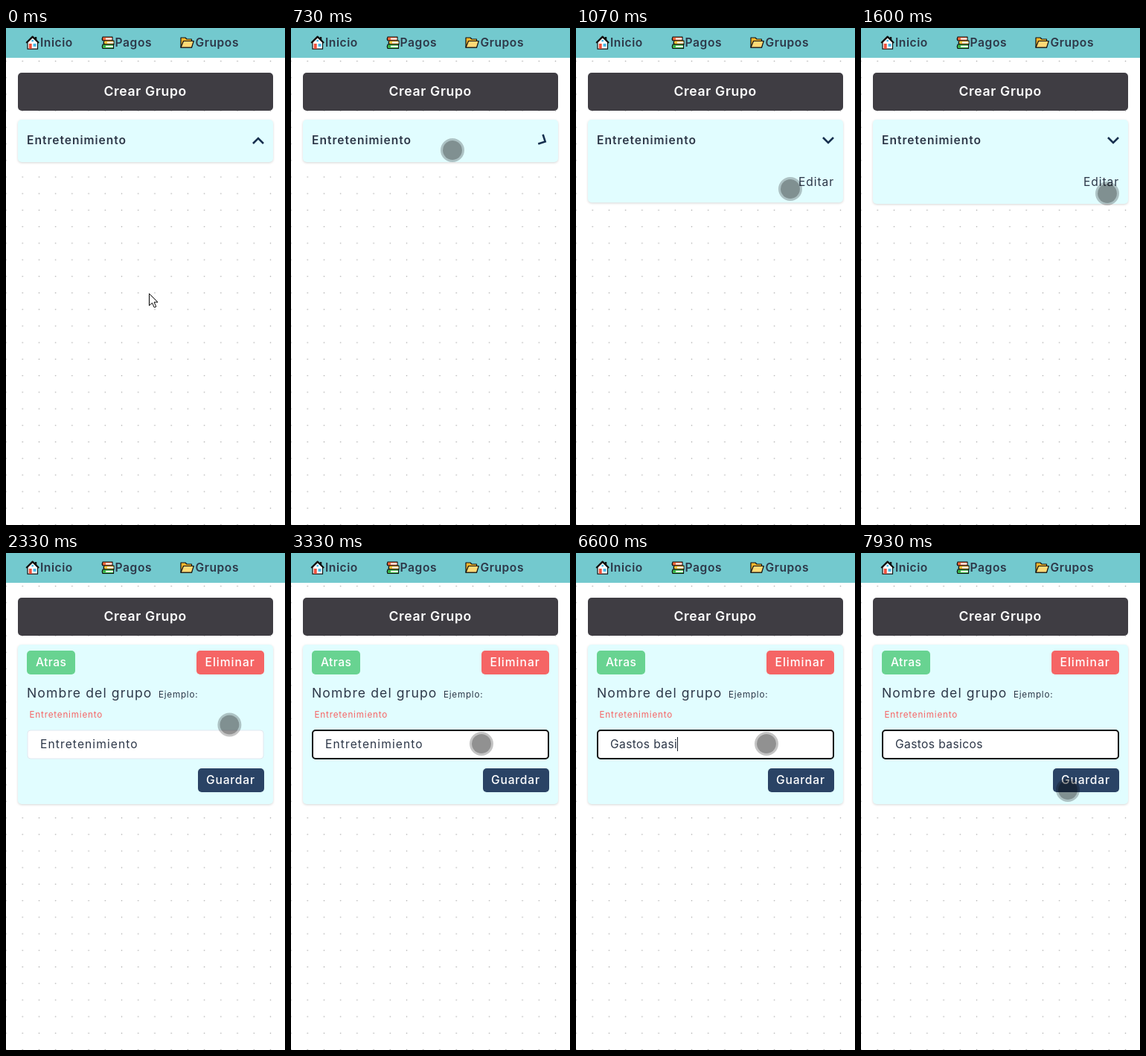
Recreate the animation shown at these times as an HTML page. Size 375 by 667 pixels, loop 8 s.

```html
<!DOCTYPE html>
<html lang="es">
<head>
<meta charset="utf-8">
<title>Grupos</title>
<style>
  html, body { margin: 0; width: 100%; height: 100%; overflow: hidden; background: #fff; }
  svg { display: block; }
  text { font: 400 15.6px Inter, "Open Sans", sans-serif; fill: #2d3748; white-space: pre; }
  .semi { font-weight: 600; }
  .medium { font-weight: 500; fill: #fff; }
  .small { font-size: 11.7px; }
  #panel { filter: drop-shadow(0 1px 1.5px rgba(0, 0, 0, .16)); }
  .icon { stroke: #111; stroke-width: 1.2; stroke-linejoin: round; }
</style>
</head>
<body>
<svg width="375" height="667" viewBox="0 0 375 667">
  <defs>
    <pattern id="dots" x="-11.11" y="-11.11" width="22.22" height="22.22" patternUnits="userSpaceOnUse">
      <circle cx="11.11" cy="11.11" r=".8" fill="#a6a6a6"/>
    </pattern>
    <clipPath id="clip"><rect id="clipRect" x="16" y="123" width="343" height="57"/></clipPath>
  </defs>
  <rect width="375" height="667" fill="#fff"/>
  <rect width="375" height="667" fill="url(#dots)"/>

  <rect width="375" height="40" fill="#73c9ce"/>
  <g class="icon" transform="translate(26 10)">
    <path d="M3 9V18.2H16.500V9L9.700 2.500Z" fill="#fff"/>
    <path d="M14 2V6" stroke-width="2.500"/>
    <path d="M1.200 10L9.700 1.500L18.200 10" fill="none" stroke-width="2"/>
    <path d="M4.800 18V11H8.700V18" fill="#f0533f" stroke="none"/>
    <rect x="10.500" y="11" width="4" height="4" fill="#48b9e8" stroke="none"/>
    <circle cx="9.700" cy="7" r="1.500" fill="#48b9e8" stroke="none"/>
  </g>
  <g class="icon" transform="translate(128 10)">
    <path d="M2 2H15V7H2Q.5 4.500 2 2Z" fill="#f2693c"/>
    <path d="M4 7H17V12H4Q2.500 9.500 4 7Z" fill="#ffc83d"/>
    <path d="M2 12H16.500V17.500H2Q.5 14.800 2 12Z" fill="#3bb54a"/>
    <path d="M6 4.500H14.500M8 9.500H16.500M6 14.800H16" stroke="#fff" stroke-width="2"/>
  </g>
  <g class="icon" transform="translate(234 10)">
    <path d="M1 16V3H7L9 5H15.500V16Z" fill="#f5b52c"/>
    <path d="M1 16.200L4.500 7.500H18.300L15.500 16.200Z" fill="#ffd976"/>
  </g>
  <text class="semi" x="46" y="25" letter-spacing=".55">Inicio</text>
  <text class="semi" x="146.500" y="25" letter-spacing=".6">Pagos</text>
  <text class="semi" x="254.500" y="25" letter-spacing=".55">Grupos</text>

  <rect x="16" y="60" width="343" height="51" rx="5" fill="#3f3d43"/>
  <text class="semi" x="131.500" y="91" letter-spacing=".65" style="font-size:17.6px;fill:#fff">Crear Grupo</text>

  <rect id="panel" x="16" y="123" width="343" height="57" rx="5" fill="#e1fdff"/>

  <g id="summary">
    <text class="semi" x="28" y="156" letter-spacing=".97">Entretenimiento</text>
    <path id="chevron" d="M332 155L339 148L346 155" fill="none" stroke="#17304f" stroke-width="2.600"/>
    <g clip-path="url(#clip)"><text x="299" y="212" letter-spacing=".9">Editar</text></g>
  </g>

  <g id="form">
    <rect x="28" y="131" width="65" height="32" rx="5" fill="#68d391"/>
    <text class="medium" x="40" y="152" letter-spacing=".4">Atras</text>
    <rect x="256" y="131" width="91" height="32" rx="5" fill="#f56565"/>
    <text class="medium" x="267.500" y="152" letter-spacing="1">Eliminar</text>
    <text x="28" y="194" letter-spacing="1.1" style="font-size:17.6px">Nombre del grupo</text>
    <text class="small" x="205" y="194" letter-spacing=".75">Ejemplo:</text>
    <text class="small" x="31.500" y="221" letter-spacing=".8" style="fill:#f56565">Entretenimiento</text>
    <rect id="field" x="29" y="238" width="317" height="38" rx="4" fill="#fff"/>
    <rect id="selection" x="46" y="247" width="133" height="19" fill="#3277d5"/>
    <text id="value" x="46" y="262"></text>
    <rect id="caret" y="247" width="1" height="19" fill="#1a202c"/>
    <rect x="258" y="289" width="89" height="32" rx="5" fill="#2a4365"/>
    <text class="medium" x="269" y="310" letter-spacing=".8">Guardar</text>
  </g>

  <path id="arrow" transform="translate(192.500 356.500)" d="M0 0V16L4 12.500L6.800 18.500L9.300 17.500L6.600 11.500H11.500Z" fill="#fff" stroke="#000"/>
  <g id="touch">
    <circle r="13" fill="#000" fill-opacity=".43"/>
    <circle r="14.500" fill="none" stroke="#000" stroke-opacity=".23" stroke-width="3"/>
  </g>
</svg>
<script>
const LOOP = 8000;
const STEP = 1000 / 15;
const el = Object.fromEntries([...document.querySelectorAll('[id]')].map(n => [n.id, n]));

// time, x, y
const touchPath = [
  [70, 210, 338], [200, 213, 262], [400, 214, 160], [600, 214, 160], [730, 217, 164],
  [870, 237, 190], [1070, 288, 216], [1330, 330, 234], [1530, 330, 234], [1600, 331, 222],
  [1930, 329, 213], [2200, 329, 213], [2400, 285, 240], [2600, 256, 256],
  [7600, 256, 256], [7800, 284, 288], [7930, 278, 318]
];

// time, field text, caret visible
const typing = [
  [0, 'Entretenimiento', 0], [2800, 'Entretenimiento', 1], [3330, 'Entretenimiento', 0],
  [3800, 'Entretenimiento', 1], [3930, 'Entretenimiento', 0], [4070, '', 1],
  [4400, 'G', 1], [4470, 'Ga', 1], [4670, 'Gas', 1], [4870, 'Gast', 1], [4930, 'Gasto', 1],
  [5070, 'Gastos', 1], [5130, 'Gastos ', 1], [5470, 'Gastos b', 1], [5670, 'Gastos bi', 1],
  [6130, 'Gastos b', 1], [6200, 'Gastos ba', 1], [6330, 'Gastos bas', 1],
  [6600, 'Gastos basi', 1], [6730, 'Gastos basic', 1], [6870, 'Gastos basico', 1],
  [7000, 'Gastos basicos', 1], [7470, 'Gastos basicos', 0]
];

const progress = (t, from, to) => Math.min(1, Math.max(0, (t - from) / (to - from)));
const easeOut = p => 1 - (1 - p) ** 2;
const between = (t, from, to) => t >= from && t < to;
const set = (node, attrs) => Object.entries(attrs).forEach(([k, v]) => node.setAttribute(k, v));
const show = (node, on) => set(node, { visibility: on ? 'visible' : 'hidden' });

function pointAt(t) {
  const next = touchPath.findIndex(p => p[0] > t);
  if (next < 0) return touchPath.at(-1).slice(1);
  if (next === 0) return touchPath[0].slice(1);
  const [a, b] = [touchPath[next - 1], touchPath[next]];
  const p = progress(t, a[0], b[0]);
  return [a[1] + (b[1] - a[1]) * p, a[2] + (b[2] - a[2]) * p];
}

function drawField(t) {
  const [, text, caretOn] = typing.findLast(row => row[0] <= t);
  const selected = between(t, 3930, 4070);
  const focused = t >= 2800;
  el.value.textContent = text;
  set(el.value, { 'letter-spacing': text[0] === 'E' ? 1.09 : .38 });
  el.value.style.fill = selected ? '#fff' : '';
  set(el.field, { stroke: focused ? '#101010' : '#e2e8f0', 'stroke-width': focused ? 2 : 1 });
  set(el.caret, { x: Math.round(46 + (text ? el.value.getComputedTextLength() : 0)) });
  el.caret.style.display = caretOn ? '' : 'none';
  el.selection.style.display = selected ? '' : 'none';
}

function draw(t) {
  const editing = t >= 2200;
  const height = editing ? 214 : 57 + 56 * easeOut(progress(t, 800, 1130));
  set(el.panel, { height });
  set(el.clipRect, { height });
  set(el.chevron, { transform: `rotate(${180 * progress(t, 600, 800)} 339 151)` });
  el.summary.style.display = editing ? 'none' : '';
  el.form.style.display = editing ? '' : 'none';
  if (editing) drawField(t);
  show(el.arrow, t < 70);
  show(el.touch, t >= 70 && !between(t, 4200, 4400));
  set(el.touch, { transform: `translate(${pointAt(t)})` });
}

function frame() {
  const now = performance.now() % LOOP;
  draw(Math.round(Math.floor((now + 4) / STEP) * STEP / 10) * 10 % LOOP);
  requestAnimationFrame(frame);
}
frame();
</script>
</body>
</html>
```
